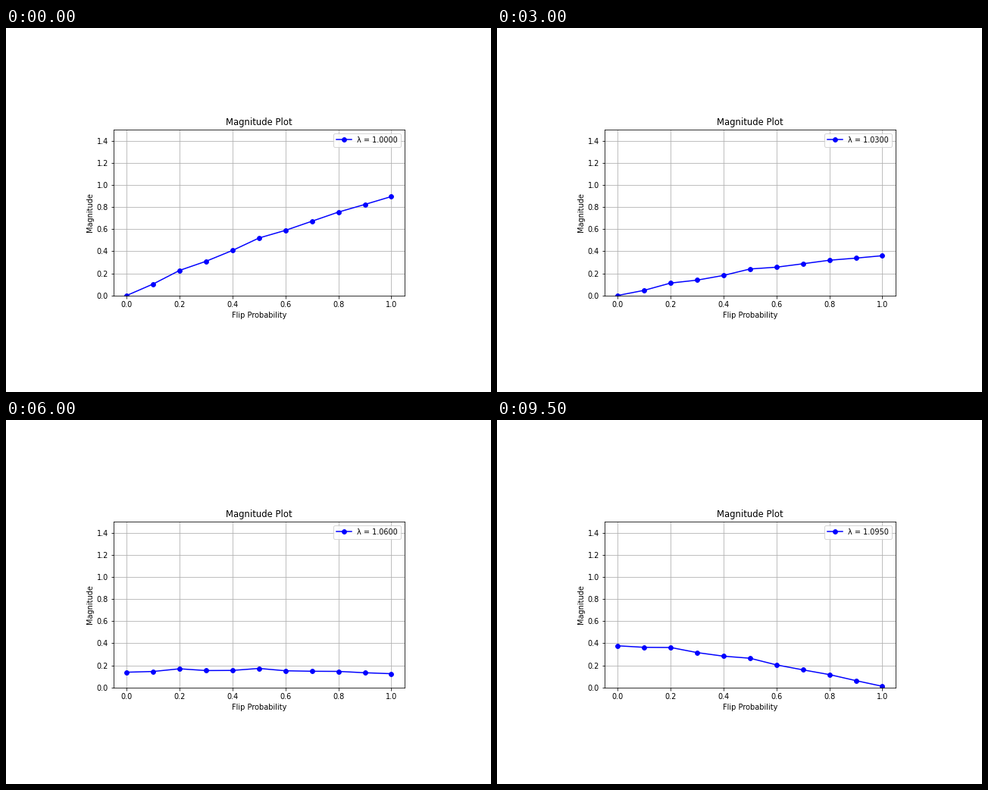
Write a matplotlib script that moves like this. It is 640 by 480 pixels and loops after 10000 ms.

```python
import numpy as np
import matplotlib.pyplot as plt
from matplotlib.animation import FuncAnimation

W, H, DPI = 640, 480, 72
STEPS, INTERVAL = 20, 500

plt.rcParams.update({
    "font.family": "DejaVu Sans",
    "font.size": 9.7,
    "lines.markersize": 5.8,
})

prob = np.linspace(0, 1, 11)
# Small fixed unevenness that fades out towards high probabilities.
ripple = 0.1 * prob * (1 - prob) ** 2 * np.cos(2 * np.pi * (prob - 0.2) / 0.3)


def magnitude(step):
    rise = 0.955 * np.exp(-0.137 * step) - 0.06
    fall = np.interp(step, [9.5, 12, 19], [0, 0.138, 0.377])
    bulge = np.interp(step, [0, 5, 12, 19], [0.06, 0.055, 0, -0.02])
    return (rise * prob + fall * np.cos(np.pi * prob / 2)
            + bulge * np.sin(np.pi * prob) + ripple)


fig = plt.figure(figsize=(W / DPI, H / DPI), dpi=DPI, facecolor="white")
ax = fig.add_axes([141.9 / W, 127.3 / H, 384 / W, 218.6 / H])
line, = ax.plot(prob, magnitude(0), "o-", color="blue", label="λ = 1.0000")
ax.set_xlim(-0.05, 1.05)
ax.set_ylim(0, 1.5)
ax.set_title("Magnitude Plot")
ax.set_xlabel("Flip Probability")
ax.set_ylabel("Magnitude")
ax.grid(True)
label = ax.legend(loc="upper right").get_texts()[0]


def update(step):
    line.set_ydata(magnitude(step))
    label.set_text(f"λ = {1 + 0.005 * step:.4f}")
    return line, label


anim = FuncAnimation(fig, update, frames=STEPS, interval=INTERVAL,
                     repeat=True, repeat_delay=0)
plt.show()
```
